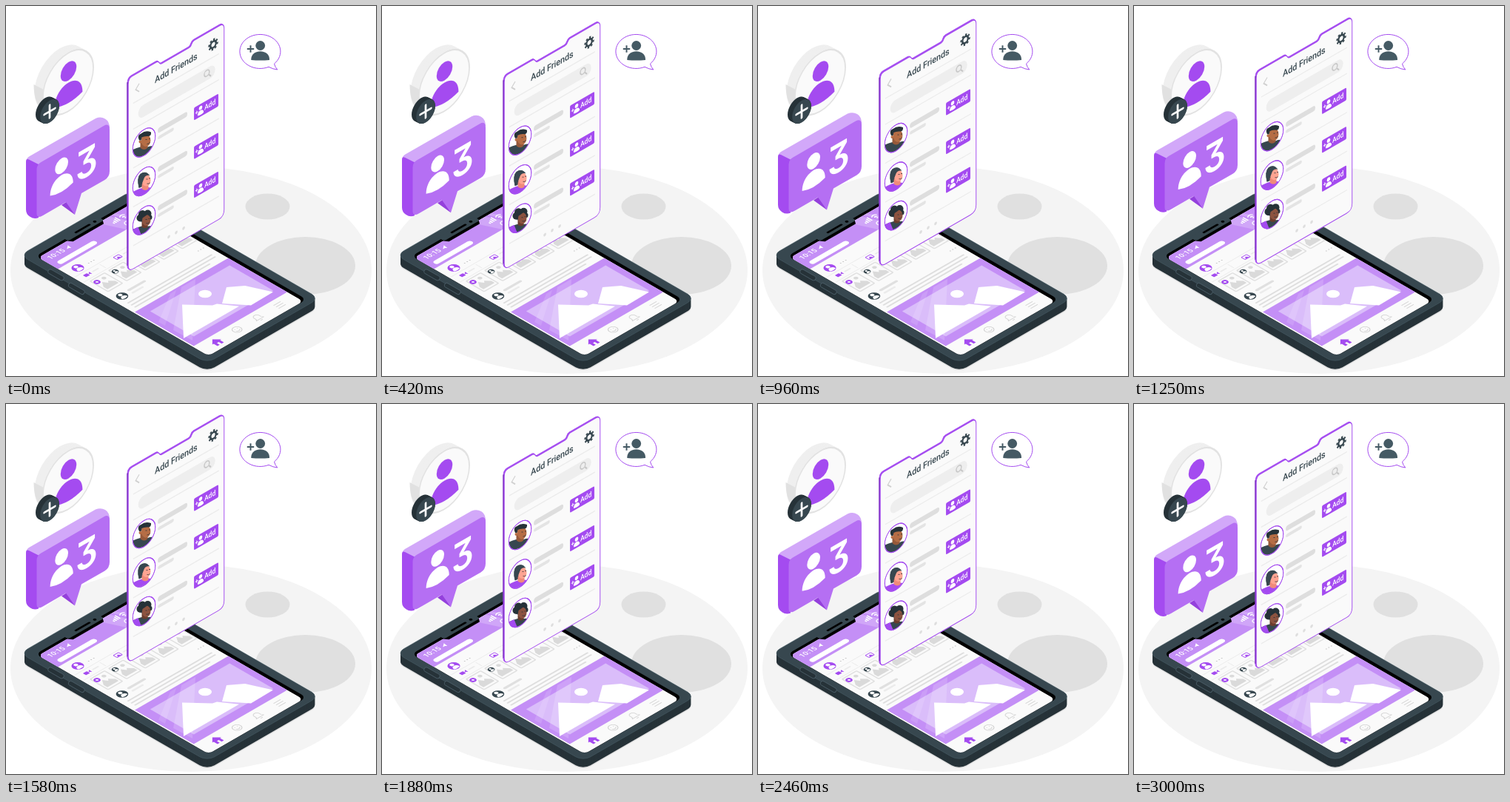
An HTML page that plays this animation: 500x500 px, repeating every 3.04 s.

```html
<!DOCTYPE html>
<html lang="en">
<head>
<meta charset="utf-8">
<title>Add Friends</title>
<style>
html, body { margin: 0; width: 100%; height: 100%; overflow: hidden; background: #fff; }
svg { display: block; width: 100vw; height: 100vh; }
text { font-family: Roboto, Inter, sans-serif; font-weight: 500; }
</style>
</head>
<body>
<svg id="stage" viewBox="0 0 500 500"></svg>
<script>
const PURPLE = '#a44bf0', LILAC = '#c48ff6', DARK = '#37474f', SLATE = '#455a64', INK = '#263238', GREY = '#e0e0e0';
const range = n => [...Array(n).keys()];

// Isometric planes: upright (facing left-front) and flat (lying phone).
const upright = (x, y, body) => `<g transform="matrix(.866 -.5 0 1 ${x} ${y})">${body}</g>`;
const flat = (x, y, body) => `<g transform="matrix(.866 -.5 .866 .5 ${x} ${y})">${body}</g>`;

const rect = (x, y, w, h, r, fill, extra = '') =>
  `<rect x="${x}" y="${y}" width="${w}" height="${h}" rx="${r}" fill="${fill}" ${extra}/>`;
const circle = (x, y, r, fill, extra = '') =>
  `<circle cx="${x}" cy="${y}" r="${r}" fill="${fill}" ${extra}/>`;
const ellipse = (x, y, rx, ry, fill, extra = '') =>
  `<ellipse cx="${x}" cy="${y}" rx="${rx}" ry="${ry}" fill="${fill}" ${extra}/>`;
const path = (d, fill, extra = '') => `<path d="${d}" fill="${fill}" ${extra}/>`;
const line = (d, color, width, extra = '') =>
  `<path d="${d}" fill="none" stroke="${color}" stroke-width="${width}" ${extra}/>`;
const text = (x, y, size, fill, value, extra = '') =>
  `<text x="${x}" y="${y}" font-size="${size}" fill="${fill}" ${extra}>${value}</text>`;
const person = (x, y, scale, fill) =>
  `<g transform="translate(${x} ${y}) scale(${scale})">${circle(0, 0, 10, fill)}
   ${path('M-17.6 31C-17.6 6 17.6 6 17.6 31Q0 38 -17.6 31Z', fill)}</g>`;

function ground() {
  return ellipse(250, 357, 244, 140, '#f4f4f4') +
    ellipse(353.5, 271, 30, 17.5, GREY) + ellipse(404.5, 351, 67.5, 39, GREY);
}

function statusBar() {
  const bars = range(4).map(i => rect(119 + i * 2.8, 29 - i * 1.8, 1.8, 3 + i * 1.8, .4, '#fff')).join('');
  return text(21, 30.5, 9.5, '#fff', '10:15') +
    path('M48 29L54 24.5L53 31L51 29.2Z', '#fff') + bars +
    line('M132 27.5Q136 23.5 140 27.5M134 30Q136 28 138 30', '#fff', 1.2) +
    circle(136, 32, .9, '#fff') + rect(145, 25, 11, 6.5, 1.2, '#fff') +
    rect(22, 38, 59, 7.2, 3.6, '#fff') +
    circle(131, 41.5, 4, 'none', 'stroke="#fff" stroke-width="1.3"');
}

function storyCard(i) {
  const x = 22.8 + i * 29;
  return rect(x, 90.5, 22.5, 28, 1.5, '#fafafa', `stroke="${GREY}" stroke-width="1.8"`) +
    path(`M${x + 2.5} 115V109L${x + 8} 101L${x + 12} 107L${x + 14.5} 104L${x + 20} 110V115Z`, '#dadada') +
    circle(x + 15, 97, 2.6, '#dadada');
}

function feed() {
  const dots = (x, y) => range(3).map(i => circle(x + i * 4, y, .8, '#c4c4c4')).join('');
  const tabs = line('M17 73H160M17 87H160M53 75V85M101 75V85', '#ebebeb', 1) +
    rect(25, 77, 6, 5, .8, PURPLE) + path('M31.5 79.5L34.5 77V82Z', PURPLE) +
    rect(37, 78.5, 10, 2.2, 1, '#ebebeb') +
    rect(73, 76.5, 8, 6, .8, '#fff', `stroke="${PURPLE}" stroke-width="1"`) +
    path('M74 82L77 78.5L80 82Z', PURPLE) + rect(85, 78.5, 10, 2.2, 1, '#ebebeb');
  const post = circle(27.6, 135.6, 6.8, DARK) + person(27.6, 132.6, .24, '#fff') +
    rect(39, 131, 28, 3.6, 1.8, GREY) + rect(39, 138, 18, 2.8, 1.4, '#ebebeb') + dots(148, 134) +
    rect(22, 148.5, 132, 2.2, 1, '#dedede') + rect(22, 154, 132, 2.2, 1, '#dedede') +
    rect(22, 159.5, 118, 2.2, 1, '#dedede');
  return circle(31, 63, 7, PURPLE) + person(31, 60, .25, '#fff') + dots(46, 65) + tabs +
    range(5).map(storyCard).join('') +
    circle(27, 97, 4, PURPLE) + line('M25 97H29M27 95V99', '#fff', .9) +
    circle(55.4, 97, 4, DARK) + person(55.4, 95.4, .14, '#fff') + post;
}

function navBar() {
  const grey = '#d2d2d2';
  return path('M32.5 271.5L39.5 264.5L46.5 271.5H44.5V277.5H41V273H38V277.5H34.5V271.5Z', PURPLE) +
    circle(72, 270.5, 5.5, 'none', `stroke="${grey}" stroke-width="1"`) +
    line('M69 272Q72 275 75 272M70 268.5V269.5M74 268.5V269.5', grey, 1) +
    line('M99 274H110L108.5 271.5V269A4 4 0 0 0 100.5 269V271.5ZM103 276.5H106', grey, 1) +
    line('M133 266.5H144M133 270.5H144M133 274.5H144', grey, 1);
}

function phone() {
  const body = (fill, extra) => rect(3.4, .8, 174.8, 291.6, 11.5, fill, extra);
  const at = (dy, shape) => flat(15.6, 338 + dy, shape);
  const side = range(12).map(i => at(11.5 - i, body(INK))).join('');
  const buttons = ['M60 359L75 367.7', 'M87.5 377.5L103 386.5'].map(run =>
    line(run, '#4a5c66', 7, 'stroke-linecap="round"') + line(run, INK, 5.4, 'stroke-linecap="round"')).join('');
  const screen = `<g clip-path="url(#screen)">` + rect(14, 18, 148, 266, 0, '#fafafa') +
    rect(14, 18, 148, 31, 0, LILAC) + path('M106 16H124L139 49H121ZM128 16H133L148 49H143Z', '#fff', 'opacity=".2"') +
    statusBar() + feed() +
    rect(16, 167, 146, 92, 0, LILAC) + rect(29, 178, 124, 68, 0, '#dabdfa') + navBar() + '</g>';
  const picture = ellipse(269, 389, 9, 5.3, '#fff') +
    path('M238 403.5L279 404.5L285 402.5L315 405.8L240 449Z', '#fff') +
    path('M298 380L323 378L332 380L361 386.5L331 404.5L292 402Z', '#fff') +
    path('M237 380L256 369L252 452L226 438Z', '#fff', 'opacity=".16"') +
    path('M222 389L230 384L215 432L206 427Z', '#fff', 'opacity=".12"');
  return at(13, body('#dedede')) + side +
    at(0, body(DARK, `stroke="${SLATE}" stroke-width=".6"`)) + buttons +
    at(0, rect(14, 14, 153, 270, 8, '#000') + screen +
      path('M57 15L63 23.5H111L117 15Z', '#000') + rect(60, 9, 56, 10, 3, DARK) +
      rect(76, 12, 24, 3, 1.5, '#000') + circle(107, 13.5, 2, '#000')) + picture;
}

function discBadge() {
  const stack = range(12).map(i => upright(73 + i, 97 + i * .55, circle(0, 0, 40, '#efefef'))).join('');
  const cap = range(7).map(i => upright(53 + i, 139.3 + i * .5, circle(0, 0, 15, INK))).join('');
  return stack + path('M37.5 106L51 113Q50 130 60 144L49 139Q37.5 131 37.5 106Z', '#e1e1e1') +
    upright(84, 103, circle(0, 0, 39.3, '#fafafa', 'stroke="#e2e2e2" stroke-width="2"') +
      person(.6, -14.5, 1.24, PURPLE)) +
    cap + upright(59, 142.5, circle(0, 0, 14.8, DARK) +
      line('M-8.5 0H8.5M0 -8.5V8.5', '#fff', 3.1, 'stroke-linecap="round"'));
}

function speechBubble() {
  return path('M355 82.3A27.5 23 0 1 1 362.5 78Q363.5 82.5 366.8 86Q361 85.5 355 82.3Z', '#fff',
      `stroke="${PURPLE}" stroke-width="1" stroke-linejoin="round"`) +
    circle(343.7, 53.5, 6.4, SLATE) +
    path('M331.3 73V71.5C332 57.8 355.4 57.8 356 71.5V73Q343.7 74 331.3 73Z', SLATE) +
    line('M325.8 58H335.2M330.5 53.3V62.7', SLATE, 2);
}

function counterBubble() {
  return path('M27 211Q27 206 31 203.5L121 152Q128 149 134 152.5Q140 156 140 165L128 172L44 222Z', '#d2a8f9') +
    path('M27 211Q27 205.5 31 207.5L44 214V286Q38 288.5 32.5 284.8Q27 281.5 27 275Z', PURPLE) +
    path('M75 269L86 262L93 282Z', '#9440dc') +
    path('M41.5 221Q41.5 214.5 47 211.2L132 162Q140 157.5 140 167V223Q140 231 133.5 235L102 253L93 282L81 265L50 283Q41.5 288 41.5 280Z', '#b56ff3') +
    upright(42, 0, person(38.3, 235, 1.02, '#fff') +
      text(77.4, 269.5, 54, '#fff', '3',
        `text-anchor="middle" style="font-family:Inter,sans-serif;font-weight:600;font-feature-settings:'cv09'"`));
}

const faces = [
  path('M-16 24V10Q-10 7 -5 6L5 6Q12 3 15 7V24Z', DARK) + path('M-5 0H5L5 7Q0 12 -5 7Z', '#96593a') +
    ellipse(2.5, -3, 6.4, 8.6, '#b56d45') + circle(-5, -1, 2, '#b56d45') +
    path('M-6.5 -3Q-10 -10 -4 -12Q2 -17 9.5 -14Q10 -9 6 -8.5Q0 -9 -3 -7L-4 -3Z', INK) +
    line('M2 -4H4M6.5 -5H8.5M4 2Q6 2 8 0', INK, .8),
  path('M-7 8Q-10 -4 -5 -10Q0 -14 5 -11L5 6Z', DARK) + path('M-16 24V15Q-8 10 -3 9L6 8Q10 8 13 11V24Z', PURPLE) +
    path('M-3 3H6V10Q2 14 -3 10Z', '#f08a7a') + ellipse(3, -1.5, 6, 8, '#ffa492') +
    path('M-7 9Q-10 -6 -5 -10Q2 -15 8 -8Q2 -9 0 -4Q-3 3 -4 8Z', DARK) +
    line('M3 -3H5M6.5 -4H8.5M4 3Q6 4 8 2', INK, .8),
  path('M-16 24V13Q-8 9 -3 8L6 8Q11 7 14 10V24Z', DARK) + path('M-16 24V13L-8 9L-2 24Z', PURPLE) +
    circle(-5, -3, 5, INK) + circle(-2, -8, 5.5, INK) + circle(5, -9, 5, INK) + circle(7.5, -4, 3.5, INK) +
    path('M-3 2H5V9Q1 12 -3 9Z', '#6b3c2d') + ellipse(3, 0, 6, 7.6, '#8c5340') +
    path('M-4.5 1Q-4 -9 5 -8Q1 -5 -2 -3L-3 3Z', INK) + line('M2 -1H4M6 -2H8M3 4Q5 5 7 3', INK, .8)
];

function friendRow(i) {
  const y = i * 52.5;
  const button = rect(104, 189.5 + y, 38, 17, 1.5, PURPLE) + person(114.3, 194.8 + y, .27, '#fff') +
    line(`M106 ${198 + y}H110.5M108.25 ${195.7 + y}V${200.3 + y}`, '#fff', 1) +
    text(120, 201 + y, 9.9, '#fff', 'Add');
  const ring = fill => circle(26, 197.5 + y, 17.6, fill, `stroke="${PURPLE}" stroke-width="1"`);
  return upright(164, 0, ring('#fff') + rect(47.5, 189 + y, 46, 7, 3, '#dedede') +
      rect(47.5, 200 + y, 25, 4.5, 2.2, '#e4e4e4') + button) +
    `<g transform="translate(186.5 ${184.5 + y})"><g clip-path="url(#avatar)">${faces[i]}</g></g>` +
    upright(164, 0, ring('none'));
}

function panel() {
  const outline = 'M0 106Q0 98 6 98H44Q47 98 48.5 101Q50 104 53 104H95Q98 104 99 101Q100.5 98 103 98H143Q149.6 98 149.6 105V350Q149.6 359 141 359H8Q0 359 0 351Z';
  const gear = circle(134, 119, 4.4, 'none', `stroke="${DARK}" stroke-width="2.8"`) +
    circle(134, 119, 6.6, 'none', `stroke="${DARK}" stroke-width="2.4" pathLength="16" stroke-dasharray="1"`);
  const search = rect(17, 146, 120, 16.5, 8, '#eeeeee') +
    circle(124, 152.8, 4, 'none', 'stroke="#c7c7c7" stroke-width="1.6"') + line('M127 156L130.5 160', '#c7c7c7', 1.8);
  const rules = [136, 171, 223.5, 276, 328.5].map(y => line(`M9 ${y}H143`, '#ebebeb', 1.4)).join('');
  return upright(163.9, -1, path(outline, PURPLE, `stroke="${PURPLE}" stroke-width="1"`) +
      line('M.2 104V352', '#7a35b8', 1.6)) +
    upright(165.2, 0, path(outline, '#fafafa', `stroke="${PURPLE}" stroke-width="1.1"`)) +
    upright(164, 0, line('M18.5 114L13 119.5L18.5 125', '#d0d0d0', 1.6) +
      text(76, 125.8, 12.4, DARK, 'Add Friends', 'text-anchor="middle"') + gear + rules + search +
      range(3).map(i => circle(64.7 + i * 11.55, 344.2, 2.1, '#dedede')).join('')) +
    range(3).map(friendRow).join('');
}

const stage = document.getElementById('stage');
stage.innerHTML = `<defs>
  <clipPath id="screen"><rect x="14" y="18" width="148" height="266" rx="7"/></clipPath>
  <clipPath id="avatar"><circle r="17.3" transform="matrix(.866 -.5 0 1 0 0)"/></clipPath>
</defs>` + ground() + phone() + discBadge() + speechBubble() +
  `<g id="floating">${counterBubble()}${panel()}</g>`;

const floating = document.getElementById('floating');
const LOOP = 3040, CYCLE = 3000, LIFT = 10;

// Linear rise and fall, with a short rest before the loop restarts.
function draw(now) {
  const phase = Math.min((now % LOOP) / CYCLE, 1);
  const lift = LIFT * (1 - Math.abs(1 - 2 * phase));
  floating.setAttribute('transform', `translate(0 ${-lift})`);
}

const start = performance.now();
function tick() {
  draw(performance.now() - start);
  requestAnimationFrame(tick);
}
tick();
</script>
</body>
</html>
```
